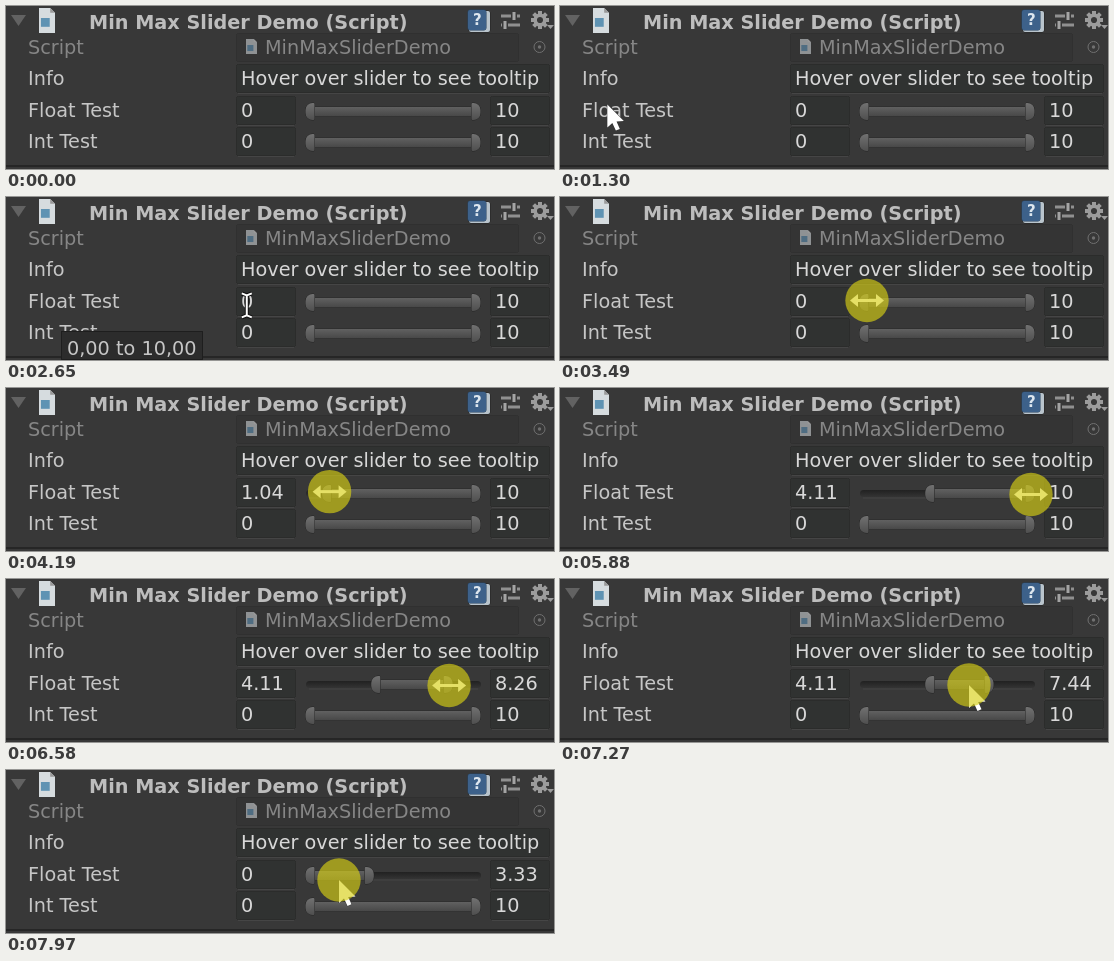
An HTML page with a canvas for the animation above (8 s loop, 548 by 163 pixels).

```html
<!DOCTYPE html>
<html lang="en">
<meta charset="utf-8">
<title>Min Max Slider</title>
<style>
  html, body { margin: 0; height: 100%; overflow: hidden; background: #383838; }
  canvas { display: block; }
</style>
<canvas id="stage" width="548" height="163"></canvas>
<script>
const c = document.getElementById('stage').getContext('2d');
const LOOP = 8000, TICK = 78;
const FONT = '19.25px "DejaVu Sans", sans-serif';
const LO = 4.11, HI = 7.44;

const leftKnob = value => 304 + 16 * value;
const rightKnob = value => 310 + 16 * value;
const move = (from, to, x, y) => ({ from, to, x, y });
const drag = (from, to, x, y) => ({ from, to, x, y, held: true });

const dragLeft = drag(4040, 4580, leftKnob(LO) + 3, 104);
const dragRight = drag(6280, 6660, rightKnob(HI) + 1, 106.5);
const dragBoth = drag(7590, 7970, 333, 110);
const path = [
  move(680, 920, 30, 70),
  move(1070, 1470, 50, 103),
  move(2410, 3190, leftKnob(0) + 3, 103.5),
  dragLeft,
  move(4880, 4880, 438, 93),
  move(4960, 5050, 481, 94),
  move(5270, 5880, rightKnob(10) + 1, 106.5),
  dragRight,
  move(6890, 7270, 409, 106),
  dragBoth,
];

// Drags run evenly, free moves slow down; both advance once per tick
function progress(t, { from, to, held }) {
  if (t < from) return 0;
  if (t >= to) return 1;
  const p = Math.min(1, (Math.floor((t - from) / TICK) + 1) * TICK / (to - from + TICK));
  return held ? p : 1 - (1 - p) ** 3;
}

function cursorAt(t) {
  let x = 99, y = 126;
  for (const step of path) {
    const p = progress(t, step);
    x += (step.x - x) * p;
    y += (step.y - y) * p;
  }
  return { x, y };
}

function rangeAt(t) {
  const shift = Math.min(LO, 4.73 * progress(t, dragBoth));
  return {
    lo: LO * progress(t, dragLeft) - shift,
    hi: 10 - (10 - HI) * progress(t, dragRight) - shift,
  };
}

function isPressed(t) {
  const pressTime = { [dragLeft.from]: 3490, [dragRight.from]: 5880, [dragBoth.from]: 7270 };
  return path.some(s => s.held && t >= pressTime[s.from] && (t < s.to || s === dragBoth));
}

function rect(x, y, w, h, color) {
  c.fillStyle = color;
  c.fillRect(x, y, w, h);
}

function paint(fill, stroke, width = 1) {
  c.lineWidth = width;
  if (stroke) { c.strokeStyle = stroke; c.stroke(); }
  if (fill) { c.fillStyle = fill; c.fill(); }
}

function rounded(x, y, w, h, r, fill, stroke) {
  c.beginPath();
  c.roundRect(x, y, w, h, r);
  paint(fill, stroke);
}

function polygon(points, fill, stroke, width) {
  c.beginPath();
  for (let i = 0; i < points.length; i += 2) c.lineTo(points[i], points[i + 1]);
  c.closePath();
  paint(fill, stroke, width);
}

function disc(x, y, r, fill, stroke, width) {
  c.beginPath();
  c.arc(x, y, r, 0, Math.PI * 2);
  paint(fill, stroke, width);
}

function text(str, x, y, color = '#c6c6c6', font = FONT) {
  c.font = font;
  c.fillStyle = color;
  c.fillText(str, x, y);
}

function field(x, y, w, value) {
  rounded(x + .5, y + .5, w - 1, 28, 2, '#303231', '#262626');
  rect(x + 2, y + 29, w - 4, 1, '#454545');
  text(value, x + 5, y + 21, '#d8d8d8');
}

function vertical(y0, y1, from, to) {
  const g = c.createLinearGradient(0, y0, 0, y1);
  g.addColorStop(0, from);
  g.addColorStop(1, to);
  return g;
}

function slider(y, lo, hi) {
  const left = leftKnob(lo), right = rightKnob(hi);
  rounded(300, y - 3.5, 175, 7, 3.5, vertical(y - 4, y + 4, '#202020', '#353535'));
  rect(303, y + 4, 169, 1, '#454545');
  rounded(left, y - 4.5, right - left, 9, 0, vertical(y - 5, y + 5, '#626262', '#474747'), '#282828');
  const knob = vertical(y - 9, y + 9, '#727272', '#4e4e4e');
  rounded(left - 4.5, y - 8.5, 9, 17, [7, 1, 1, 7], knob, '#242424');
  rounded(right - 4.5, y - 8.5, 9, 17, [1, 7, 7, 1], knob, '#242424');
}

function page(x, y, w, h, fill, mark) {
  const fold = w * .3;
  polygon([x, y, x + w - fold, y, x + w, y + fold, x + w, y + h, x, y + h], fill);
  polygon([x + w - fold, y, x + w, y + fold, x + w - fold, y + fold], '#999');
  rect(x + w * .12, y + h * .4, w * .55, w * .55, mark);
}

function header() {
  polygon([5, 9, 20, 9, 12.5, 20], '#626262');
  page(33, 2, 16, 25, '#d6dcdf', '#5f93b3');
  text('Min Max Slider Demo (Script)', 83, 23, '#bdbdbd', 'bold ' + FONT);

  rounded(463, 5, 21, 21, 2, '#b9c4cc', '#222');
  rounded(462, 4, 18, 20, 2, '#3d618a', '#24415f');
  text('?', 467, 19, '#dde6ee', 'bold 15px "DejaVu Sans", sans-serif');

  for (const [y, knob] of [[10, 508], [19, 499]]) {
    rect(495, y - 1.5, 19, 3, '#909090');
    rect(knob - 3, y - 4, 6, 8, '#383838');
    rect(knob - 1.5, y - 4, 3, 8, '#a4a4a4');
  }

  c.save();
  c.translate(534, 14);
  for (let i = 0; i < 8; i++) {
    rect(-2, -9, 4, 5, '#9c9c9c');
    c.rotate(Math.PI / 4);
  }
  disc(0, 0, 4.8, null, '#9c9c9c', 3.5);
  c.restore();
  polygon([541, 19, 548, 19, 544.5, 23], '#9c9c9c');
}

function numberRow(label, y, lo, hi) {
  const show = value => String(+value.toFixed(2));
  text(label, 22, y + 21);
  field(230, y, 60, show(lo));
  field(484, y, 60, show(hi));
  slider(y + 15.5, lo, hi);
}

function panel({ lo, hi }) {
  rect(0, 0, 548, 163, '#383838');
  rect(0, 159, 548, 2, '#262626');
  header();

  text('Script', 22, 48, '#868686');
  rounded(230.5, 27.5, 282, 28, 2, '#343434', '#2d2d2d');
  page(240, 33, 11, 15, '#8f9294', '#4f6d82');
  text('MinMaxSliderDemo', 259, 48, '#868686');
  disc(533.5, 41, 5.5, null, '#707070');
  disc(533.5, 41, 1.7, '#707070');

  text('Info', 22, 79);
  field(230, 58, 314, 'Hover over slider to see tooltip');
  numberRow('Float Test', 90, lo, hi);
  numberRow('Int Test', 121, 0, 10);
}

function cursorKind({ x, y }, { lo, hi }) {
  if (y > 90 && y < 120) {
    if (x > 230 && x < 290 || x > 484) return 'beam';
    if (Math.abs(x - leftKnob(lo)) < 6 || Math.abs(x - rightKnob(hi)) < 6) return 'resize';
  }
  return 'arrow';
}

const cursors = {
  arrow() {
    polygon([0, 0, 0, 23, 5, 18.5, 8.5, 26, 12.5, 24.3, 9.2, 17, 16.5, 16.5], '#fff', '#333', 1);
  },
  resize() {
    rect(-12, -1.5, 24, 3, '#fff');
    for (const side of [-1, 1]) polygon([17 * side, 0, 9 * side, -6.5, 9 * side, 6.5], '#fff');
  },
  beam() {
    c.beginPath();
    for (const side of [-1, 1]) {
      const end = 5 + 12 * side;
      c.moveTo(-5, end);
      c.lineTo(0, end - 2 * side);
      c.lineTo(5, end);
    }
    c.moveTo(0, -5);
    c.lineTo(0, 15);
    paint(null, '#111', 4);
    paint(null, '#fff', 2);
  },
};

function draw(t) {
  const pos = cursorAt(t), range = rangeAt(t);
  panel(range);
  if (t >= 1930 && t < 2720) {
    rounded(55.5, 134.5, 141, 28, 0, '#2c2c2c', '#111');
    text('0,00 to 10,00', 61, 158);
  }
  if (t >= 680) {
    c.save();
    c.translate(pos.x, pos.y);
    cursors[cursorKind(pos, range)]();
    c.restore();
  }
  if (isPressed(t)) disc(pos.x, pos.y, 21.7, 'rgba(216, 208, 20, .65)');
}

function frame() {
  draw(performance.now() % LOOP);
  requestAnimationFrame(frame);
}
frame();
</script>
</html>
```
